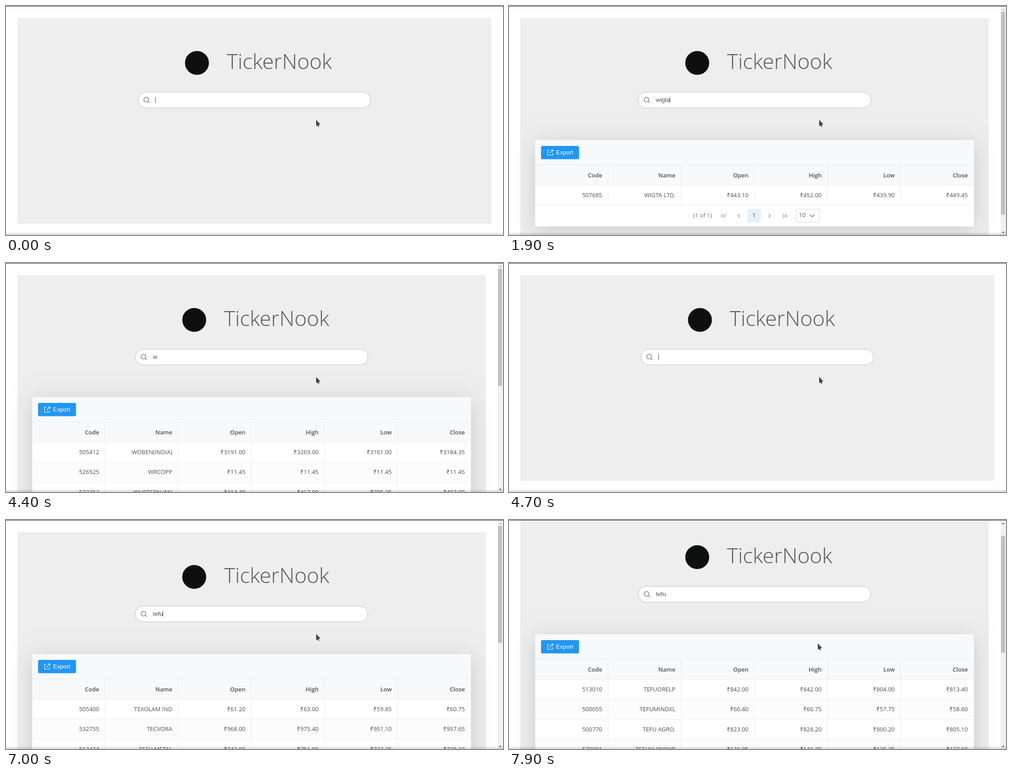
Write an HTML page with a canvas that moves like this. It is 1101 by 509 pixels and loops after 8 s.

```html
<!DOCTYPE html>
<html lang="en">
<head>
<meta charset="utf-8">
<title>Stock search</title>
<style>
html, body { margin: 0; width: 100%; height: 100%; overflow: hidden; background: #fff; }
canvas { display: block; width: 1101px; height: 509px; }
</style>
</head>
<body>
<canvas id="stage" width="1101" height="509"></canvas>
<script>
const W = 1101, H = 509, LOOP = 8000;
const ctx = document.getElementById('stage').getContext('2d');
const SANS = '"Open Sans", sans-serif';
const BODY = '13px ' + SANS;
const INPUT = '13.333px "Liberation Sans", Arial, sans-serif';
const INK = '#495057', LINE = '#e9ecef', PANEL = '#f8f9fa';
const COLUMNS = ['Code', 'Name', 'Open', 'High', 'Low', 'Close'];

const TABLES = {
  w: [
    '505412|WOBEN(INDIA)|3191.00|3269.00|3161.00|3184.35',
    '526525|WRCOPP|11.45|11.45|11.45|11.45',
    '533252|WUBTERN INV|414.40|417.90|385.25|407.00'
  ],
  wi: [
    '507685|WIGTA LTD.|443.10|452.00|439.90|449.45',
    '517498|WILDRA CAB|128.30|131.75|126.10|129.20',
    '538268|WINDOLEX|96.15|98.40|94.55|95.80'
  ],
  one: ['507685|WIGTA LTD.|443.10|452.00|439.90|449.45'],
  t: [
    '505400|TEXOLAM IND|61.20|63.00|59.85|60.75',
    '532755|TECVORA|968.00|975.40|951.10|957.65',
    '513434|TEFU METAL|742.00|751.90|733.25|738.10'
  ],
  tefu: [
    '513010|TEFUORELP|842.00|842.00|804.00|813.40',
    '500055|TEFUMINDXL|60.40|60.75|57.75|58.60',
    '500770|TEFU AGRO.|823.00|828.20|800.20|805.10',
    '570001|TEFUKLRNDVP|136.95|141.20|135.25|137.60'
  ]
};
for (const key in TABLES) TABLES[key] = TABLES[key].map(row => row.split('|'));

// time, typed text, caret visible
const TYPING = [
  [0, '', 1], [200, '', 0], [800, 'w', 1], [1200, 'wi', 1], [1400, 'wig', 1],
  [1600, 'wigt', 1], [1900, 'wigta', 1], [2600, 'wigta', 0], [3200, 'wigt', 1],
  [3400, 'wig', 1], [3600, 'wi', 1], [3800, 'wi', 0], [4200, 'w', 0], [4500, '', 1],
  [5000, '', 0], [5500, '', 1], [6200, '', 0], [6300, 't', 1], [6500, 'te', 1],
  [6700, 'tef', 1], [7000, 'tefu', 1], [7500, 'tefu', 0]
];
const RESULTS = [
  [0, ''], [1200, 'w'], [1400, 'wi'], [1700, 'one'], [3800, 'wi'],
  [4400, 'w'], [4700, ''], [6900, 't'], [7300, 'tefu']
];
// time, pointer x, pointer y, scroll offset
const POINTER = [[0, 687, 253, 0], [7700, 686, 256, 0], [7800, 685, 260, 0], [7900, 684, 274, 44]];

const at = (track, t) => track.filter(step => step[0] <= t).pop();

function rect(x, y, w, h, color) {
  ctx.fillStyle = color;
  ctx.fillRect(x, y, w, h);
}

function pill(x, y, w, h, r, fill, stroke) {
  ctx.beginPath();
  ctx.roundRect(x, y, w, h, r);
  ctx.fillStyle = fill;
  ctx.fill();
  if (stroke) {
    ctx.strokeStyle = stroke;
    ctx.lineWidth = 1;
    ctx.stroke();
  }
}

function text(str, x, y, font, color, align = 'left') {
  ctx.font = font;
  ctx.fillStyle = color;
  ctx.textAlign = align;
  ctx.fillText(str, x, y);
}

function path(points, color, width) {
  ctx.beginPath();
  points.forEach(([x, y]) => ctx.lineTo(x, y));
  ctx.strokeStyle = color;
  ctx.lineWidth = width;
  ctx.stroke();
}

function shape(points, color) {
  ctx.beginPath();
  points.forEach(([x, y]) => ctx.lineTo(x, y));
  ctx.closePath();
  ctx.fillStyle = color;
  ctx.fill();
}

function drawHeader(dx) {
  ctx.beginPath();
  ctx.arc(423 + dx, 126.5, 26.5, 0, Math.PI * 2);
  ctx.fillStyle = '#0e0f0f';
  ctx.fill();
  text('TickerNook', 489 + dx, 140, '300 46.6px ' + SANS, '#565656');
}

function drawSearch(dx, typed, caret, misspelt) {
  pill(292.5 + dx, 191.5, 515, 35, 17.5, '#fff', '#bdbdbd');
  ctx.beginPath();
  ctx.arc(310.6 + dx, 208.2, 5.3, 0, Math.PI * 2);
  ctx.strokeStyle = '#5f676e';
  ctx.lineWidth = 1.2;
  ctx.stroke();
  path([[314.4 + dx, 212], [317.8 + dx, 215.4]], '#5f676e', 1.2);

  const x = 331.5 + dx;
  text(typed, x, 213, INPUT, INK);
  const end = Math.floor(x + ctx.measureText(typed).width);
  if (misspelt) for (let u = x + 0.5; u < end; u += 4) rect(Math.floor(u), 214, 2, 1, '#e06a6a');
  if (caret) rect(end, 202, 1, dx ? 13 : 14, INK);
}

function drawExport() {
  pill(71, 311, 84, 29.5, 3, '#2196f3');
  path([[90, 320.5], [85.5, 320.5], [85.5, 331.5], [96.5, 331.5], [96.5, 327]], '#fff', 1.2);
  path([[93, 319.5], [97.5, 319.5], [97.5, 324]], '#fff', 1.2);
  path([[97.5, 319.5], [90, 327]], '#fff', 1.2);
  text('Export', 104, 330, INPUT, '#fff');
}

function chevron(x, dir) {
  path([[x - 2 * dir, 462.5], [x + 2 * dir, 466.5], [x - 2 * dir, 470.5]], '#868e96', 1.1);
}

function drawPaginator() {
  text('(1 of 1)', 429, 470, BODY, '#6c757d', 'center');
  [472, 477.5, 509].forEach(x => chevron(x, -1));
  [577, 608.5, 614].forEach(x => chevron(x, 1));
  pill(528, 451, 30, 30, 3, '#e3f2fd');
  text('1', 543, 470, BODY, INK, 'center');
  pill(635.5, 451.5, 52, 29, 3, '#fff', '#ced4da');
  text('10', 642, 469, BODY, INK);
  path([[666.5, 463.5], [671.8, 468.7], [677, 463.5]], '#6c757d', 1.5);
}

function drawTable(rows) {
  const single = rows.length === 1, x0 = 58, width = 972;
  const bottom = single ? 490 : 900;
  ctx.save();
  ctx.shadowColor = 'rgba(0,0,0,.15)';
  ctx.shadowBlur = 45;
  ctx.shadowOffsetY = 8;
  rect(x0, 298, width, bottom - 298, '#fff');
  ctx.restore();

  rect(x0, 298, width, 100, PANEL);
  rect(x0, 353, width, 1, LINE);
  rect(x0, 398, width, 1, LINE);
  drawExport();

  rows.forEach((row, i) => {
    const y = Math.round(398 + i * 44.4);
    if (i % 2) rect(x0, y + 1, width, 44, '#fcfcfc');
    rect(x0, Math.round(398 + (i + 1) * 44.4), width, 1, LINE);
    row.forEach((cell, c) =>
      text((c > 1 ? '₹' : '') + cell, x0 + (c + 1) * 162 - 13.5, y + 27, BODY, INK, 'right'));
  });
  const end = Math.round(398 + rows.length * 44.4);
  COLUMNS.forEach((name, c) => {
    const right = x0 + (c + 1) * 162;
    text(name, right - 13.5, 381, '600 13px ' + SANS, INK, 'right');
    if (c < 5) rect(right - 1, 354, 1, end - 354, LINE);
  });
  if (single) drawPaginator();
}

function drawScrollbar(scroll, single) {
  rect(1089, 1, 12, H - 1, '#f1f1f1');
  rect(1090, 13 + scroll / 2, 9, single ? 451 : 260, '#c1c1c1');
  shape([[1092, 9], [1095, 6], [1098, 9]], scroll ? '#505050' : '#a3a3a3');
  shape([[1092, 502], [1095, 505], [1098, 502]], '#505050');
}

function drawPointer(x, y) {
  const outline = [[0, 0], [0, 14], [3, 12.5], [5.5, 16], [7, 15], [5.7, 11.5], [9.3, 10]]
    .map(([px, py]) => [x + px, y + py]);
  ctx.lineJoin = 'round';
  path(outline.concat([outline[0]]), 'rgba(255,255,255,.6)', 1.6);
  shape(outline, '#454545');
  ctx.lineJoin = 'miter';
}

function drawEdges() {
  const fade = ctx.createLinearGradient(0, 502, 0, H);
  fade.addColorStop(0, 'rgba(0,0,0,0)');
  fade.addColorStop(1, 'rgba(0,0,0,.15)');
  rect(0, 502, W, 7, fade);
  rect(0, 0, W, 1, '#2d2b45');
}

function draw(t) {
  const [, typed, caret] = at(TYPING, t);
  const rows = TABLES[at(RESULTS, t)[1]];
  const [, px, py, scroll] = at(POINTER, t);
  const dx = rows ? -6 : 0;

  rect(0, 0, W, H, '#fff');
  ctx.save();
  ctx.translate(0, -scroll);
  rect(25, 27, rows ? 1038 : 1050, rows ? 900 : 457, '#eee');
  drawHeader(dx);
  drawSearch(dx, typed, caret, t >= 2900 && t < 3200);
  if (rows) drawTable(rows);
  ctx.restore();
  if (rows) drawScrollbar(scroll, rows.length === 1);
  drawEdges();
  drawPointer(px, py);
}

const start = performance.now();
function tick() {
  draw((performance.now() - start) % LOOP);
  requestAnimationFrame(tick);
}
tick();
</script>
</body>
</html>
```
